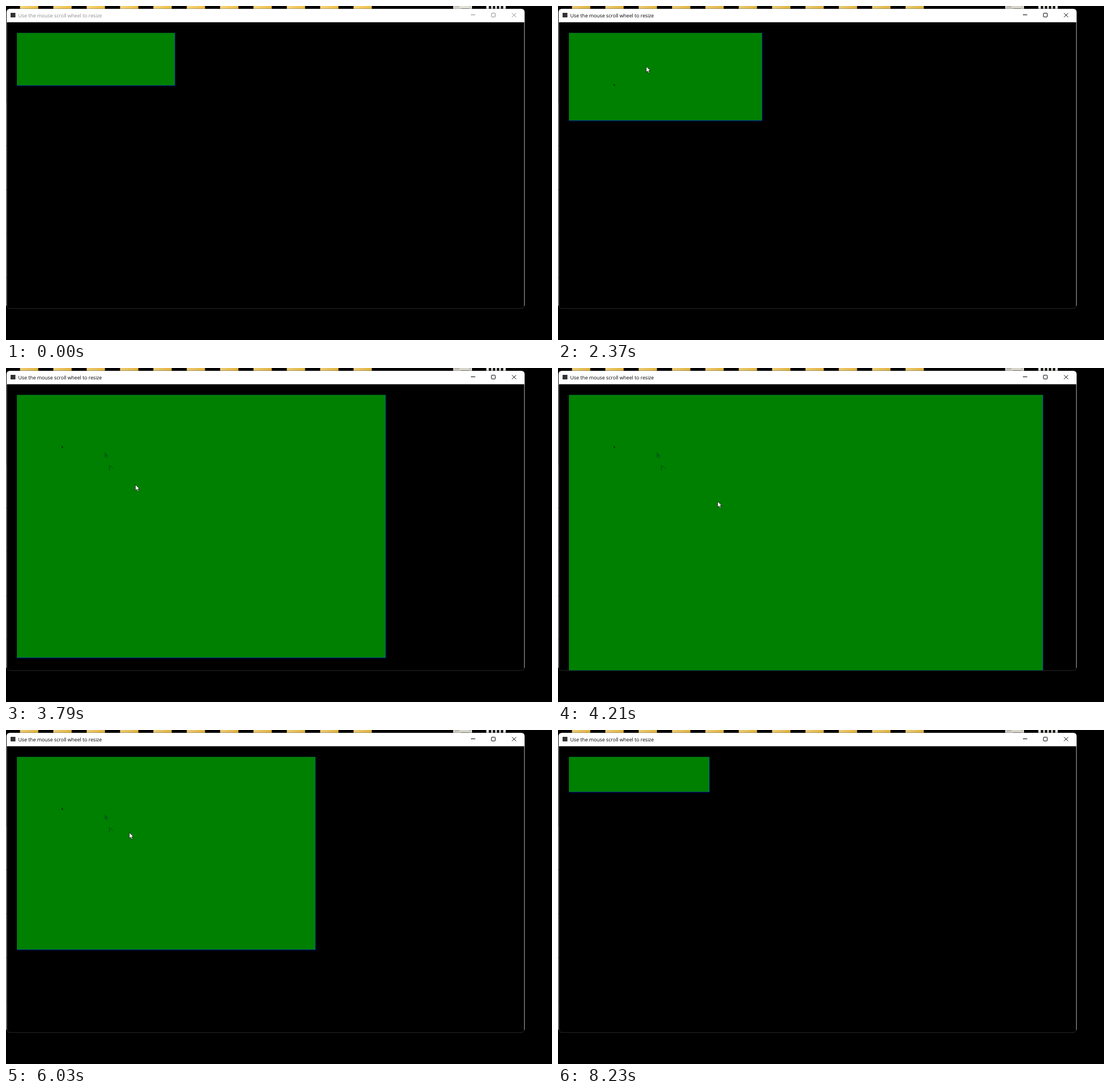
An HTML page that plays this animation: 956x586 px, repeating every 8900 ms.

```html
<!DOCTYPE html>
<html lang="en">
<head>
<meta charset="utf-8">
<title>Resize</title>
<style>
  html, body { margin: 0; width: 100%; height: 100%; overflow: hidden; background: #000; }
  svg { display: block; width: 956px; height: 586px; }
  text { font: 8.67px "Open Sans", "Noto Sans", sans-serif; text-rendering: geometricPrecision; }
</style>
</head>
<body>
<svg viewBox="0 0 956 586">
  <defs>
    <linearGradient id="gold"><stop stop-color="#f8d67c"/><stop offset="1" stop-color="#eebd43"/></linearGradient>
    <clipPath id="client"><rect x="1" y="28" width="907" height="502.5"/></clipPath>
    <clipPath id="inside"><rect id="clip"/></clipPath>
    <path id="arrow" d="M0 0V10.2L2.4 8 4 11.7 5.8 10.9 4.2 7.4H7.4Z"/>
  </defs>
  <rect width="956" height="586"/>
  <g id="desk">
    <g id="folders"></g>
    <path d="M783 0h33v5h-33z" fill="#e4e1d9"/>
    <path d="M785 1.5h9M797 4.5h14M811 1h2" stroke="#8d897d" stroke-width=".8"/>
    <path d="M841 0h34v5h-34z" fill="#f2f0ea"/>
    <path d="M845.5 2.5h28" stroke="#111" stroke-width="5" stroke-dasharray="4 3"/>
  </g>
  <path d="M.5 170V525" stroke="#555" stroke-dasharray="74 3"/>
  <rect x="1.2" y="5.2" width="906.6" height="525.6" rx="6" stroke="#292929"/>
  <path d="M1 28V526M907.7 28V526" stroke="#a5a5a5"/>
  <path d="M1 28.4V11q0-6 6-6H902q6 0 6 6V28.4Z" fill="#fff"/>
  <rect x="8" y="12" width="8.5" height="8" fill="#333"/>
  <text x="21.5" y="19.8" id="title">Use the mouse scroll wheel to resize</text>
  <g id="buttons" fill="none">
    <path d="M814 15.5h7.6"/>
    <rect x="850" y="12.6" width="6.6" height="6.6" rx=".7"/>
    <path d="M886 12.4l7.2 7.2M893.2 12.4l-7.2 7.2"/>
  </g>
  <g clip-path="url(#client)">
    <rect id="edge" fill="#0000c8"/>
    <rect id="panel" fill="#008000"/>
    <g id="trails" clip-path="url(#inside)" fill="#006410">
      <path data-from="600" d="M97 136.5l3.5 3h-2.5z" fill="#000"/>
      <use data-from="2720" href="#arrow" x="172.5" y="147.3"/>
      <path data-from="3250" d="M181 180V170.5l6.5 6.5" fill="none" stroke="#005010"/>
      <use data-from="6030" href="#arrow" x="216" y="180"/>
    </g>
  </g>
  <use id="cursor" href="#arrow" fill="#fff" stroke="#000" stroke-width=".7"/>
</svg>
<script>
const $ = id => document.getElementById(id);
const LOOP = 8900, FOCUS = 1300, ENTER = 70, LEAVE = 8230;
const LEFT = 19.1, TOP = 47.2, NOTCH = 30.74, BORDER = 0.8;

// time, wheel notches (panel width), cursor x, cursor y
const keys = [
  [ENTER, 9, 830, 580],
  [600, 9, 74, 125],
  [830, 9, 104, 94],
  [1760, 9, 104, 94],
  [2370, 11, 154.5, 106],
  [3250, 15, 181, 173],
  [3580, 18, 200, 190],
  [4210, 27, 279.5, 234],
  [4550, 27, 279.5, 234],
  [5500, 21.4, 270, 239],
  [5830, 17, 216, 180],
  [6030, 17, 216, 180],
  [6630, 11, 201.5, 162],
  [7250, 8, 171, 123],
  [7450, 8, 171, 123],
  [LEAVE, 8, 893, 586]
];

function set(el, attrs) {
  for (const key in attrs) el.setAttribute(key, attrs[key]);
}

function show(el, on) {
  set(el, { visibility: on ? "visible" : "hidden" });
}

function pose(t) {
  const next = keys.findIndex(k => k[0] > t);
  if (next < 0) return keys[keys.length - 1];
  const b = keys[next], a = keys[next - 1] || b;
  const f = a === b ? 0 : (t - a[0]) / (b[0] - a[0]);
  return a.map((v, i) => v + (b[i] - v) * f);
}

for (let i = 0; i < 11; i++) {
  const folder = document.createElementNS("http://www.w3.org/2000/svg", "rect");
  set(folder, { x: 24.5 + i * 58.4, width: 32, height: 5, fill: "url(#gold)" });
  $("folders").append(folder);
}

function draw(t) {
  const active = t >= FOCUS;
  const ink = active ? "#000" : "#8c8c8c";
  set($("title"), { fill: ink });
  set($("buttons"), { stroke: ink });
  set($("desk"), { opacity: active ? 0.95 : 1 });

  const [, notches, x, y] = pose(t);
  const n = Math.round(notches);
  const box = { x: LEFT, y: TOP, width: n * NOTCH, height: (n - 6) * NOTCH };
  set($("panel"), box);
  set($("clip"), box);
  set($("edge"), { ...box, width: box.width + BORDER, height: box.height + BORDER });
  for (const mark of $("trails").children) show(mark, t >= mark.dataset.from);

  set($("cursor"), { transform: `translate(${x} ${y})` });
  show($("cursor"), t >= ENTER && t < LEAVE);
}

const begin = performance.now();
function tick() {
  draw((performance.now() - begin) % LOOP);
  requestAnimationFrame(tick);
}
tick();
</script>
</body>
</html>
```
